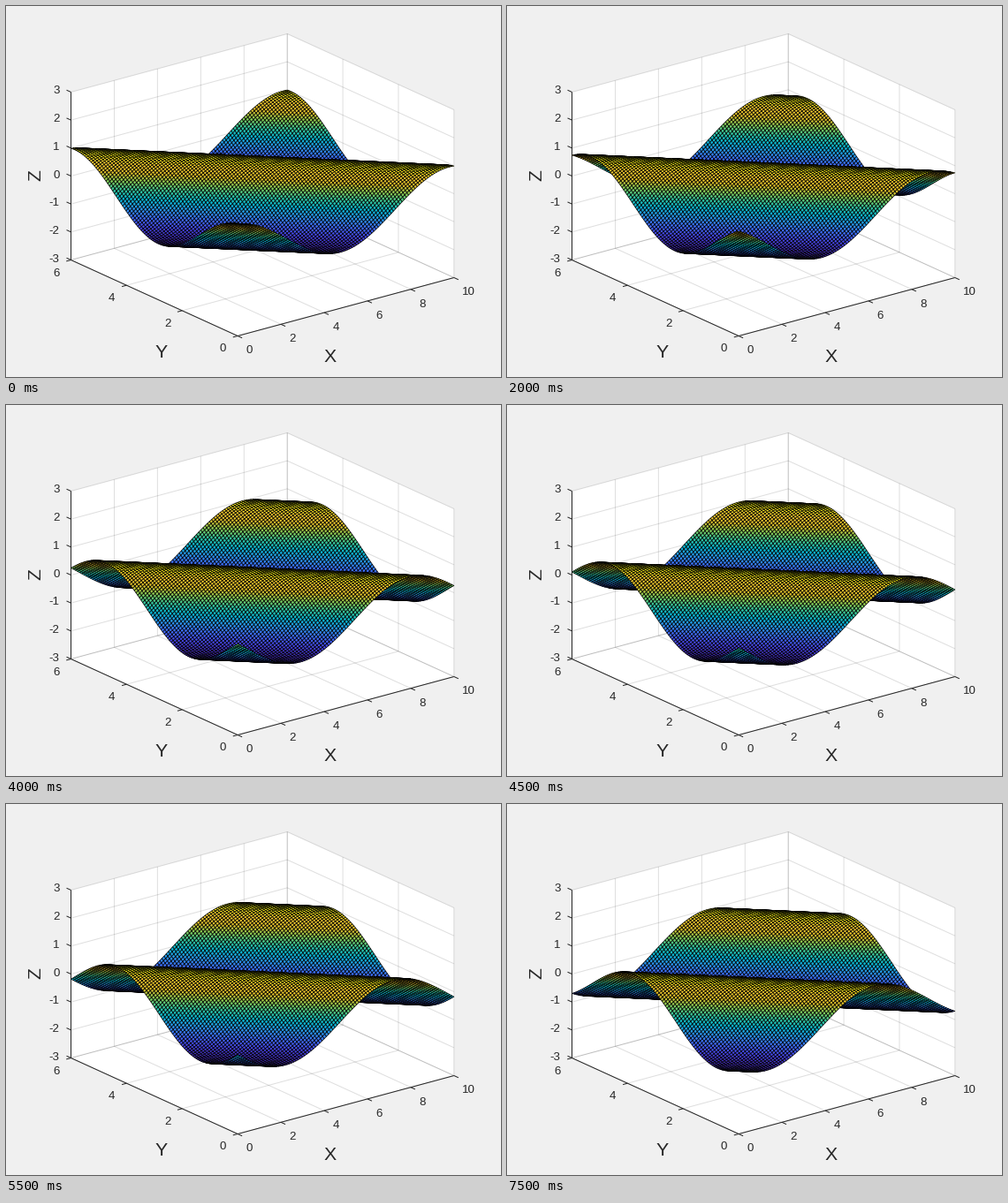
A matplotlib script for the animation above (8 s loop, 560 px wide and 420 px high).

```python
import numpy as np
import matplotlib.pyplot as plt
from matplotlib.animation import FuncAnimation
from matplotlib.collections import LineCollection, PolyCollection
from matplotlib.colors import LinearSegmentedColormap

W, H, DPI = 560, 420, 100
FRAMES, INTERVAL = 16, 500
CELLS = 100
PHASE_STEP = 0.146
LX, LY, LZ = 10, 6, 3
INK = "#262626"
PARULA = LinearSegmentedColormap.from_list(
    "parula", "#3e26a8 #4747eb #3e6fff #2797eb #08b5d0 "
              "#31c69f #81cc59 #dcbd29 #fccf30 #f9fb15".split())

# Screen direction of one unit along each axis
ORIGIN = np.array([261.6, 373])
UX, UY, UZ = np.array([[24.47, -6.6], [-31.43, -14.33], [0, -31.67]])


def px(n):
    """Pixels to points."""
    return n * 72 / DPI


def project(x, y, z):
    """Orthographic view of the box, in stage pixels."""
    x, y, z = (np.asarray(v)[..., None] for v in (x, y, z))
    return ORIGIN + x * UX + y * UY + (z + LZ) * UZ


plt.rcParams["font.family"] = "Liberation Sans"
plt.rcParams["axes.unicode_minus"] = False
fig = plt.figure(figsize=(W / DPI, H / DPI), dpi=DPI, facecolor="#f0f0f0")
ax = fig.add_axes([0, 0, 1, 1])
ax.set(xlim=(-0.5, W - 0.5), ylim=(H - 0.5, -0.5))
ax.axis("off")


def path(*points):
    return [project(*p) for p in points]


def lines(segments, color, z):
    ax.add_collection(LineCollection(segments, colors=color, linewidths=px(1),
                                     zorder=z, capstyle="butt"), autolim=False)


def label(x, y, text, size=13.3, ha="center", **kw):
    ax.text(x, y, text, fontsize=px(size), ha=ha, va="baseline", color=INK, **kw)


# Walls and floor
walls = [
    path((0, 0, -LZ), (LX, 0, -LZ), (LX, LY, -LZ), (0, LY, -LZ)),
    path((0, LY, -LZ), (LX, LY, -LZ), (LX, LY, LZ), (0, LY, LZ)),
    path((LX, 0, -LZ), (LX, LY, -LZ), (LX, LY, LZ), (LX, 0, LZ)),
]
ax.add_collection(PolyCollection(walls, facecolors="white", edgecolors="none",
                                 zorder=0), autolim=False)

xticks, yticks, zticks = range(0, LX + 1, 2), range(0, LY + 1, 2), range(-LZ, LZ + 1)
grid = [path((x, 0, -LZ), (x, LY, -LZ), (x, LY, LZ)) for x in xticks]
grid += [path((0, y, -LZ), (LX, y, -LZ), (LX, y, LZ)) for y in yticks]
grid += [path((0, LY, z), (LX, LY, z), (LX, 0, z)) for z in zticks]
lines(grid, (0.15, 0.15, 0.15, 0.15), 1)

# Axes, ticks and tick labels
lines([path((0, LY, LZ), (0, LY, -LZ), (0, 0, -LZ), (LX, 0, -LZ))], INK, 2)


def tick_axis(points, values, direction, dx, dy, ha):
    step = 5.5 * direction / np.hypot(*direction)
    lines([[p, p + step] for p in points], INK, 2)
    for (x, y), v in zip(points, values):
        label(x + dx, y + dy, str(v), ha=ha)


tick_axis([project(x, 0, -LZ) for x in xticks], xticks, -UY, 9.5, 20, "left")
tick_axis([project(0, y, -LZ) for y in yticks], yticks, -UX, -13, 18, "right")
tick_axis([project(0, LY, z) for z in zticks], zticks, UY, -13, 2, "right")

label(366, 403, "X", 21.3)
label(175, 398, "Y", 21.3)
label(39, 191.5, "Z", 21.3, rotation=90, rotation_mode="anchor")

# Surface, ordered from the far corner to the near one
X, Y = np.meshgrid(np.linspace(LX, 0, CELLS + 1), np.linspace(LY, 0, CELLS + 1))
surface = PolyCollection([], edgecolors="black", linewidths=px(0.7), zorder=3)
ax.add_collection(surface, autolim=False)


def draw(i):
    phase = PHASE_STEP * (i + 1)
    Z = np.cos(2 * np.pi * (X / LX + Y / LY) + phase)
    P = project(X, Y, Z)
    quads = np.stack([P[:-1, :-1], P[:-1, 1:], P[1:, 1:], P[1:, :-1]], axis=2)
    surface.set_verts(quads.reshape(-1, 4, 2))
    surface.set_facecolor(PARULA((Z[1:, 1:].ravel() + 1) / 2))
    return surface,


anim = FuncAnimation(fig, draw, frames=FRAMES, interval=INTERVAL, repeat=True)
plt.show()
```
